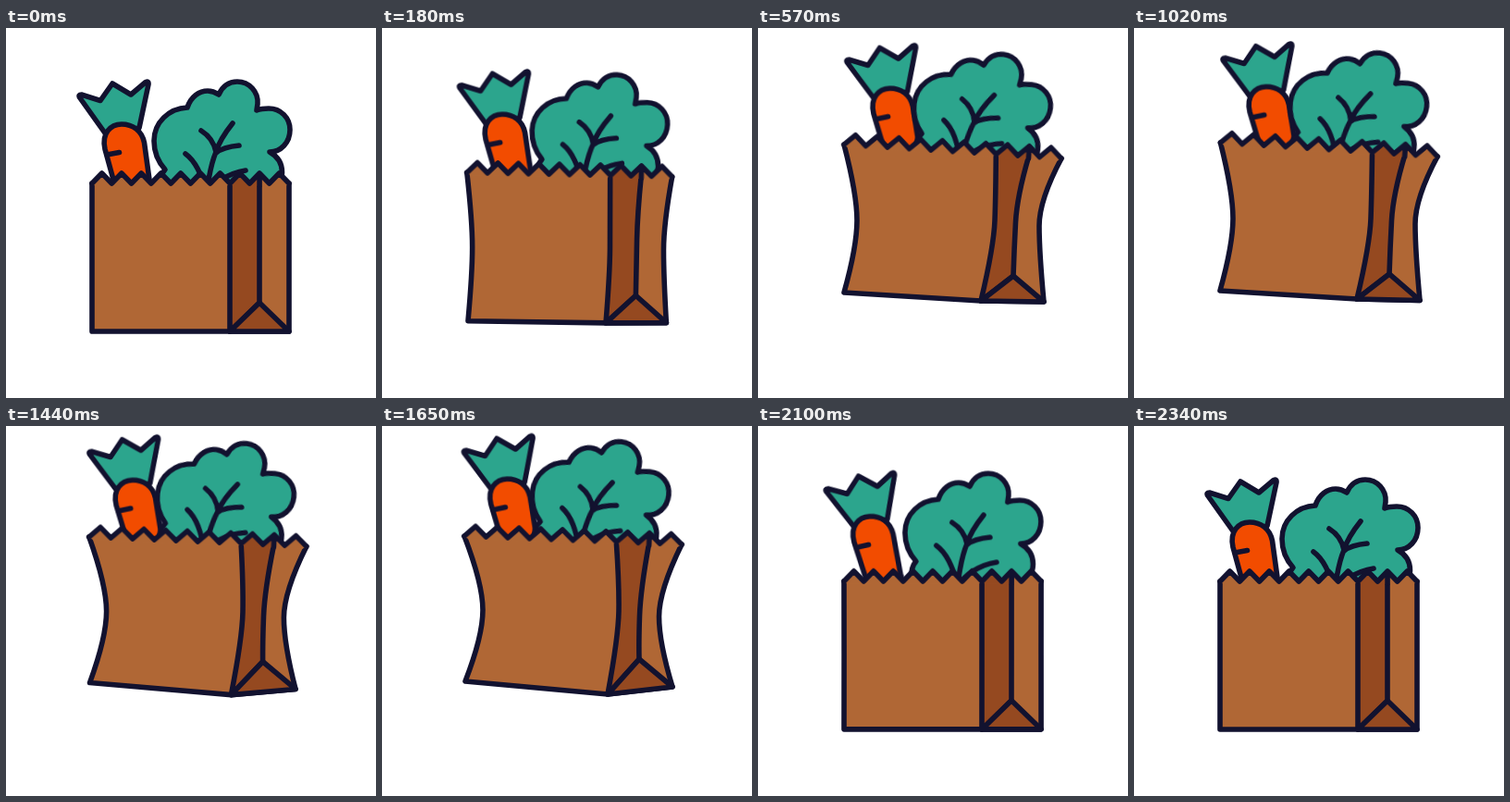
Animation of 400 by 400 pixels, one loop 4370 ms. Source, as an HTML page without scripts:

```html
<!DOCTYPE html>
<html lang="en">
<head>
<meta charset="utf-8">
<title>Grocery bag</title>
<style>
html, body { margin: 0; width: 100%; height: 100%; overflow: hidden; background: #fff; }
svg { display: block; width: 100%; height: 100%; }
.line { fill: none; stroke: #12122f; stroke-width: 5.6; stroke-linecap: round; stroke-linejoin: round; }
.kraft { fill: #b06735; }
.shade { fill: #954920; }
.green { fill: #2ca58d; }
.orange { fill: #f24c00; }
.teeth path { vector-effect: non-scaling-stroke; }

.carrot, .lettuce, .teeth, .body, .gusset, .flap { animation: 4370ms infinite; }
.carrot { animation-name: carrot; transform-origin: 124px 140px; }
.lettuce { animation-name: lettuce; transform-origin: 230px 130px; }
.teeth { animation-name: teeth; }
.body { animation-name: body; }
.gusset { animation-name: gusset; }
.flap { animation-name: flap; }

@keyframes carrot {
  0% { transform: translate(0, 0) rotate(0deg); animation-timing-function: cubic-bezier(.45, 0, .75, .8); }
  7.55% { transform: translate(13.5px, -27.5px) rotate(-1.6deg); animation-timing-function: cubic-bezier(.3, .39, .7, .97); }
  13.04% { transform: translate(18.2px, -38.7px) rotate(-1.2deg); animation-timing-function: linear; }
  23.34% { transform: translate(18.4px, -40.5px) rotate(-1.2deg); animation-timing-function: cubic-bezier(.4, .2, .6, 1); }
  37.76% { transform: translate(11px, -46.7px) rotate(-1.4deg); animation-timing-function: cubic-bezier(.5, .05, .7, .8); }
  43.25% { transform: translate(2.8px, -21.3px) rotate(1.4deg); animation-timing-function: cubic-bezier(.3, .3, .7, .9); }
  46.68% { transform: translate(-3px, -7px) rotate(-3deg); animation-timing-function: ease-in-out; }
  52.86%, 100% { transform: translate(0, 0) rotate(0deg); }
}
@keyframes lettuce {
  0% { transform: translate(0, 0) rotate(0deg) scale(1); animation-timing-function: cubic-bezier(.45, 0, .75, .8); }
  7.55% { transform: translate(3.7px, -22.3px) rotate(5.5deg) scale(.985); animation-timing-function: cubic-bezier(.3, .39, .7, .97); }
  13.04% { transform: translate(7.4px, -32.2px) rotate(6.5deg) scale(1); animation-timing-function: linear; }
  23.34% { transform: translate(7.7px, -33.7px) rotate(6.5deg) scale(1); animation-timing-function: cubic-bezier(.4, .2, .6, 1); }
  37.76% { transform: translate(1.3px, -43.5px) rotate(6deg) scale(1); animation-timing-function: cubic-bezier(.5, .05, .7, .8); }
  43.25% { transform: translate(-4px, -23.5px) rotate(0deg) scale(1); animation-timing-function: cubic-bezier(.3, .3, .5, 1); }
  52.86%, 100% { transform: translate(0, 0) rotate(0deg) scale(1); }
}
@keyframes teeth {
  0% { transform: translate(93px, 168px) rotate(0deg) scale(1, 1); animation-timing-function: cubic-bezier(.45, 0, .75, .8); }
  7.55% { transform: translate(90px, 138px) rotate(2.9deg) scale(1.106, 1); animation-timing-function: cubic-bezier(.3, .39, .7, .97); }
  13.04% { transform: translate(93px, 126px) rotate(3.65deg) scale(1.105, 1); animation-timing-function: linear; }
  23.34% { transform: translate(93.5px, 124px) rotate(3.65deg) scale(1.103, 1); animation-timing-function: cubic-bezier(.4, .2, .6, 1); }
  37.76% { transform: translate(89px, 119px) rotate(2.2deg) scale(1.104, 1); animation-timing-function: cubic-bezier(.5, .05, .6, .9); }
  43.25% { transform: translate(92.5px, 166px) rotate(-.1deg) scale(1.007, 1); animation-timing-function: ease-out; }
  49.43%, 100% { transform: translate(93px, 168px) rotate(0deg) scale(1, 1); }
}
@keyframes body {
  0% { d: path("M93 168Q93 220 93 248T93 328L242 328L306 328Q306 276 306 248T306 168"); animation-timing-function: cubic-bezier(.45, 0, .75, .8); }
  7.55% { d: path("M90 138Q105 192 105 220T93 299L242 304.5L309.5 304Q302 256 302 228T325.5 150"); animation-timing-function: cubic-bezier(.3, .39, .7, .97); }
  13.04% { d: path("M93 126Q107 180 107 208T93 286L241 295L309 296Q304 242 304 214T328 141"); animation-timing-function: linear; }
  23.34% { d: path("M93.5 124Q107 178 107 206T93 284L241 293L309 294.5Q304 240 304 212T328 139"); animation-timing-function: cubic-bezier(.4, .2, .6, 1); }
  37.76% { d: path("M89 119Q109 171 109 199T90 276L244 290L314 282Q299.5 234 299.5 206T324 128"); animation-timing-function: cubic-bezier(.5, .05, .6, .9); }
  43.25% { d: path("M92.5 166Q94 218 94 246T93 326L242 326.5L307 326Q306.5 274 306.5 246T307 165.6"); animation-timing-function: ease-out; }
  49.43%, 100% { d: path("M93 168Q93 220 93 248T93 328L242 328L306 328Q306 276 306 248T306 168"); }
}
@keyframes gusset {
  0% { d: path("M242 168Q242 220 242 248T242 328L274 297Q274 260 274 232T274 168"); animation-timing-function: cubic-bezier(.45, 0, .75, .8); }
  7.55% { d: path("M254 146.3Q254 194 253.5 222T242 304.5L275 277Q276.5 252 278 224T290 148"); animation-timing-function: cubic-bezier(.3, .39, .7, .97); }
  13.04% { d: path("M257.3 136.5Q257 180 256 208T241 295L276 268Q277 238 278.5 210T292.7 138.7"); animation-timing-function: linear; }
  23.34% { d: path("M257.5 134.5Q257 178 256 206T241 293L276 266Q277 236 278.5 208T293 136.7"); animation-timing-function: cubic-bezier(.4, .2, .6, 1); }
  37.76% { d: path("M253.3 125.3Q256.5 172 256 200T244 290L278 252Q277.5 233 278.5 205T288.7 126.7"); animation-timing-function: cubic-bezier(.5, .05, .6, .9); }
  43.25% { d: path("M242.5 165.7Q243 218 242.5 246T242 326.5L274 295Q274 258 274.5 230T275 165.7"); animation-timing-function: ease-out; }
  49.43%, 100% { d: path("M242 168Q242 220 242 248T242 328L274 297Q274 260 274 232T274 168"); }
}
@keyframes flap {
  0% { d: path("M242 328L274 297L306 328z"); animation-timing-function: cubic-bezier(.45, 0, .75, .8); }
  7.55% { d: path("M242 304.5L275 277L309.5 304z"); animation-timing-function: cubic-bezier(.3, .39, .7, .97); }
  13.04% { d: path("M241 295L276 268L309 296z"); animation-timing-function: linear; }
  23.34% { d: path("M241 293L276 266L309 294.5z"); animation-timing-function: cubic-bezier(.4, .2, .6, 1); }
  37.76% { d: path("M244 290L278 252L314 282z"); animation-timing-function: cubic-bezier(.5, .05, .6, .9); }
  43.25% { d: path("M242 326.5L274 295L307 326z"); animation-timing-function: ease-out; }
  49.43%, 100% { d: path("M242 328L274 297L306 328z"); }
}
</style>
</head>
<body>
<svg viewBox="0 0 400 400">
  <g class="carrot">
    <path class="line green" d="M108 115L79.500 75Q78 72 81.500 72L102 78.500L115 60L135 72L151 58.500Q154.500 57 154 61L144 108z"/>
    <path class="line orange" d="M130 215L107 131C103 114 113 104 125 104C137 104 147 111 149.500 124L162 215"/>
    <path class="line" d="M109 137L122.500 134.500M156 170L143.500 172.500L146 180"/>
  </g>
  <g class="lettuce">
    <path class="line green" d="M178 215C163 180 165 160 172 153C163 143 160 132 160 122C160 102 176 87 196 86C200 74 209 68 218 68C223 68 227 70 230 72C234 63 241 58 250 58C263 58 273 69 272 82L271 89C276 87 280 87 284 87C297 87 307 97 307 110C307 124 297 134 285 134C294 139 298.500 147 298.500 156C298.500 172 286 182 262 215"/>
    <path class="line" d="M214 205C217 170 221 148 227 134C230 124 237 113 245 103M211 111C219 116 225 124 227 134M252 127C242 128 233 130 227 135M194 136C205 144 211 158 217 178M259 154C240 157 224 168 217 180"/>
  </g>
  <path class="body line kraft" d="M93 168Q93 220 93 248T93 328L242 328L306 328Q306 276 306 248T306 168"/>
  <path class="gusset line shade" d="M242 168Q242 220 242 248T242 328L274 297Q274 260 274 232T274 168"/>
  <path class="flap line shade" d="M242 328L274 297L306 328z"/>
  <g class="teeth">
    <path class="kraft" d="M0 0l10.650-11 10.650 11 10.650-11 10.650 11 10.650-11 10.650 11 10.650-11 10.650 11 10.650-11 10.650 11 10.650-11 10.650 11 10.650-11 10.650 11l-4 3H4z"/>
    <path class="shade" d="M149.100 0l10.650-11 10.650 11 10.650-11V0l-3 3h-25z"/>
    <path class="kraft" d="M181.050-11L191.700 0l10.650-11L213 0l-4 3h-25l-2.950-3z"/>
    <path class="line" d="M0 0l10.650-11 10.650 11 10.650-11 10.650 11 10.650-11 10.650 11 10.650-11 10.650 11 10.650-11 10.650 11 10.650-11 10.650 11 10.650-11 10.650 11 10.650-11 10.650 11 10.650-11 10.650 11 10.650-11 10.650 11M181.050 2v-13"/>
  </g>
</svg>
</body>
</html>
```
